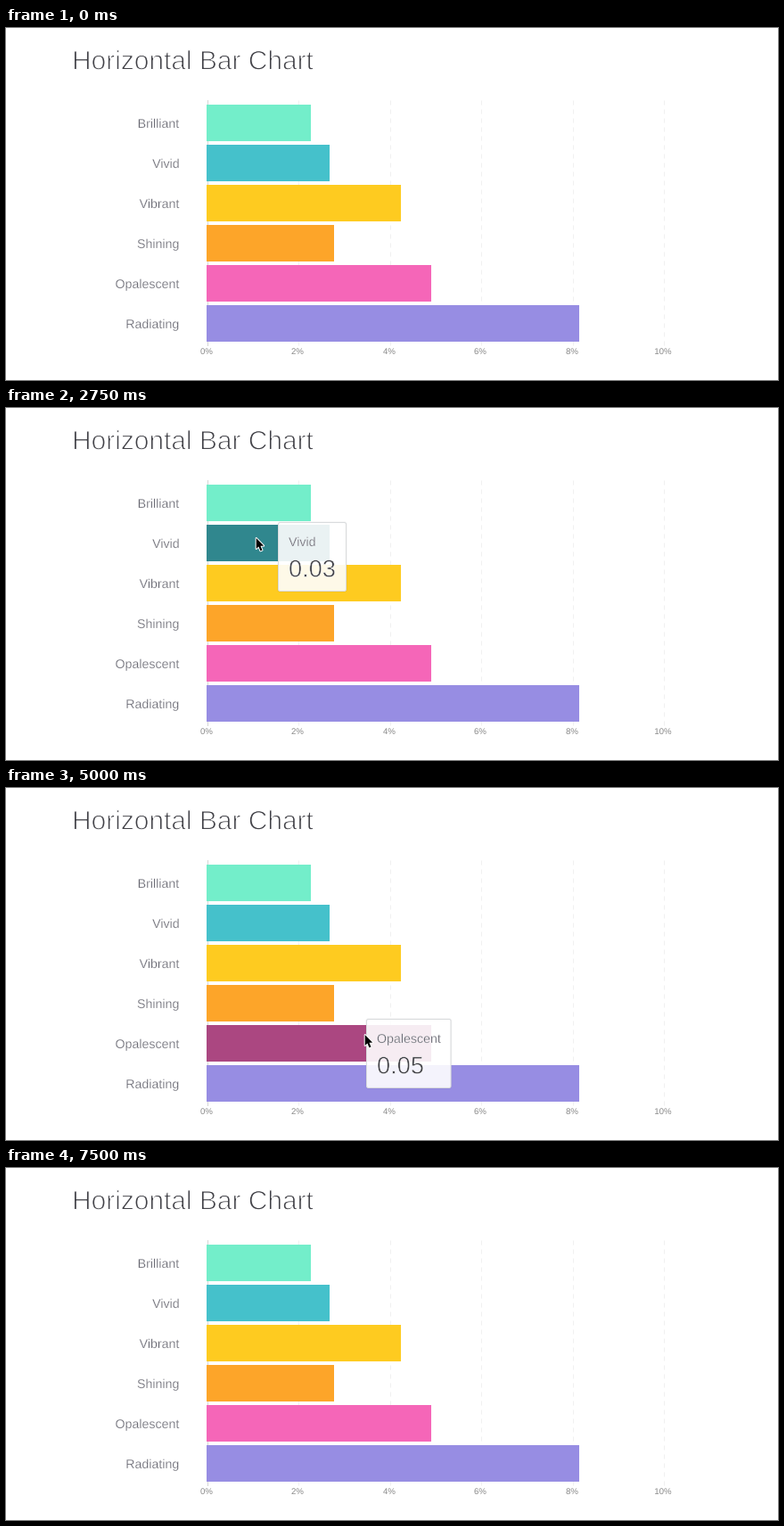
Animation, 866 px wide and 395 px high, one loop 8250 ms. Source, as a matplotlib script:

```python
import matplotlib.pyplot as plt
import numpy as np
from matplotlib.animation import FuncAnimation
from matplotlib.colors import to_rgb
from matplotlib.patches import FancyBboxPatch, Polygon, Rectangle
from matplotlib.patheffects import Normal, Stroke
from matplotlib.textpath import TextPath

W, H, DPI = 866, 395, 64
PT = 72 / DPI  # points per pixel
STEP, STEPS = 250, 33
LEFT, TOP, PITCH, BAR_H = 225, 86, 45, 41
UNIT = 51.2  # pixels per percent
LABEL_PX, VALUE_PX = 14.2, 27.2
INK, GREY, PALE = "#404046", "#666670", "#8a8a8a"

plt.rcParams["font.family"] = "Liberation Sans"

# name, percent, colour
BARS = [
    ("Brilliant", 2.285, "#73eeca"),
    ("Vivid", 2.695, "#45c1cb"),
    ("Vibrant", 4.258, "#fecb20"),
    ("Shining", 2.793, "#fda529"),
    ("Opalescent", 4.922, "#f566b8"),
    ("Radiating", 8.164, "#978de3"),
]

# key points of the pointer's path: step, x, y
PATH = np.array([
    (1, 348, 14), (6, 268, 48), (8, 291, 107), (10, 282, 108),
    (11, 280, 145), (13, 278, 168), (15, 295, 198), (17, 296, 250),
    (18, 316, 254), (20, 402, 276), (22, 396, 287), (24, 415, 338),
    (26, 415, 338), (27, 438, 366),
])

ARROW = 0.88 * np.array([(0, 0), (0, 13.6), (3.1, 10.8), (5.4, 16.3),
                         (7.7, 15.3), (5.4, 10), (9.6, 9.8)]) + (0.7, 1)


def pointer(step):
    return np.array([np.interp(step, PATH[:, 0], PATH[:, k]) for k in (1, 2)])


def pointer_shown(step):
    return step == 1 or 6 <= step <= 27


def hovered(y):
    row, inside = divmod(y - TOP, PITCH)
    if 0 <= row < len(BARS) and inside < BAR_H:
        return int(row)
    return None


def tip_corner(step):
    """Right of the pointer, half a step late; flips up near the bottom."""
    x = pointer(step - 0.5)[0] + 24
    y = pointer(step)[1]
    return round(x), round(y - 71 if y > 279 else y - 17)


def shade(color, k=0.7):
    return tuple(k * c for c in to_rgb(color))


def put_text(x, y, s, px, color, ha="left", thin=0, z=2):
    """Text on a baseline; thin trims the stems for a light weight."""
    t = ax.text(x, y, s, fontsize=px * PT, color=color, ha=ha,
                va="baseline", zorder=z)
    trim = Stroke(linewidth=thin * PT, foreground="white")
    t.set_path_effects([trim if thin else Normal()])
    return t


def tip_width(name):
    text_w = TextPath((0, 0), name, size=LABEL_PX).get_extents().width
    return 24 + max(52.5, text_w)


def tip_box(z, **style):
    box = FancyBboxPatch((0, 0), 77, 78, zorder=z,
                         boxstyle="round,pad=0,rounding_size=2", **style)
    return ax.add_patch(box)


fig = plt.figure(figsize=(W / DPI, H / DPI), dpi=DPI, facecolor="white")
ax = fig.add_axes([0, 0, 1, 1])
ax.set_xlim(0, W)
ax.set_ylim(H, 0)
ax.axis("off")

put_text(74, 46.5, "Horizontal Bar Chart", 29.9, INK, thin=1.05)

for pct in range(0, 11, 2):
    x = round(LEFT + UNIT * pct)
    style = {"dashes": (5, 5)} if pct else {}
    ax.plot([x + 0.5] * 2, [81, 356], lw=PT, zorder=0,
            color="#f0f0f0" if pct else "#d4d4d4", **style)
    put_text(x, 366, f"{pct}%", 9.6, PALE, ha="center")

rects = []
for i, (name, pct, color) in enumerate(BARS):
    y = TOP + PITCH * i
    rects.append(ax.add_patch(Rectangle((LEFT, y), round(UNIT * pct), BAR_H,
                                        fc=color, lw=0, zorder=1)))
    put_text(195, y + 26, name, LABEL_PX, GREY, ha="right", thin=0.25)

widths = [tip_width(bar[0]) for bar in BARS]
glow = tip_box(4, fc="none", ec=(0, 0, 0, 0.04), lw=2.4 * PT)
panel = tip_box(5, fc=(1, 1, 1, 0.9), ec="#d9dbdd", lw=PT)
tip_name = put_text(0, 0, "", LABEL_PX, GREY, thin=0.25, z=6)
tip_value = put_text(0, 0, "", VALUE_PX, INK, thin=0.6, z=6)
tooltip = [glow, panel, tip_name, tip_value]

halo = ax.add_patch(Polygon(ARROW, fc="white", ec="white", lw=2 * PT,
                            joinstyle="round", zorder=8))
arrow = ax.add_patch(Polygon(ARROW, fc="black", lw=0, zorder=9))


def update(step):
    spot = pointer(step)
    shown = pointer_shown(step)
    for art in (halo, arrow):
        art.set_visible(shown)
        art.set_xy(ARROW + spot)

    hover = hovered(spot[1]) if shown else None
    for i, (rect, bar) in enumerate(zip(rects, BARS)):
        rect.set_facecolor(shade(bar[2]) if i == hover else bar[2])

    for art in tooltip:
        art.set_visible(hover is not None)
    if hover is not None:
        name, pct, _ = BARS[hover]
        x, y = tip_corner(step)
        for box in (glow, panel):
            box.set_bounds(x + 0.5, y + 0.5, widths[hover] - 0.5, 77)
        tip_name.set_text(name)
        tip_name.set_position((x + 12, y + 27))
        tip_value.set_text(f"{pct / 100:.2f}")
        tip_value.set_position((x + 12, y + 61.5))
    return [*rects, *tooltip, halo, arrow]


anim = FuncAnimation(fig, update, frames=STEPS, interval=STEP,
                     init_func=lambda: update(0), repeat=True,
                     repeat_delay=0, blit=False)
plt.show()
```
